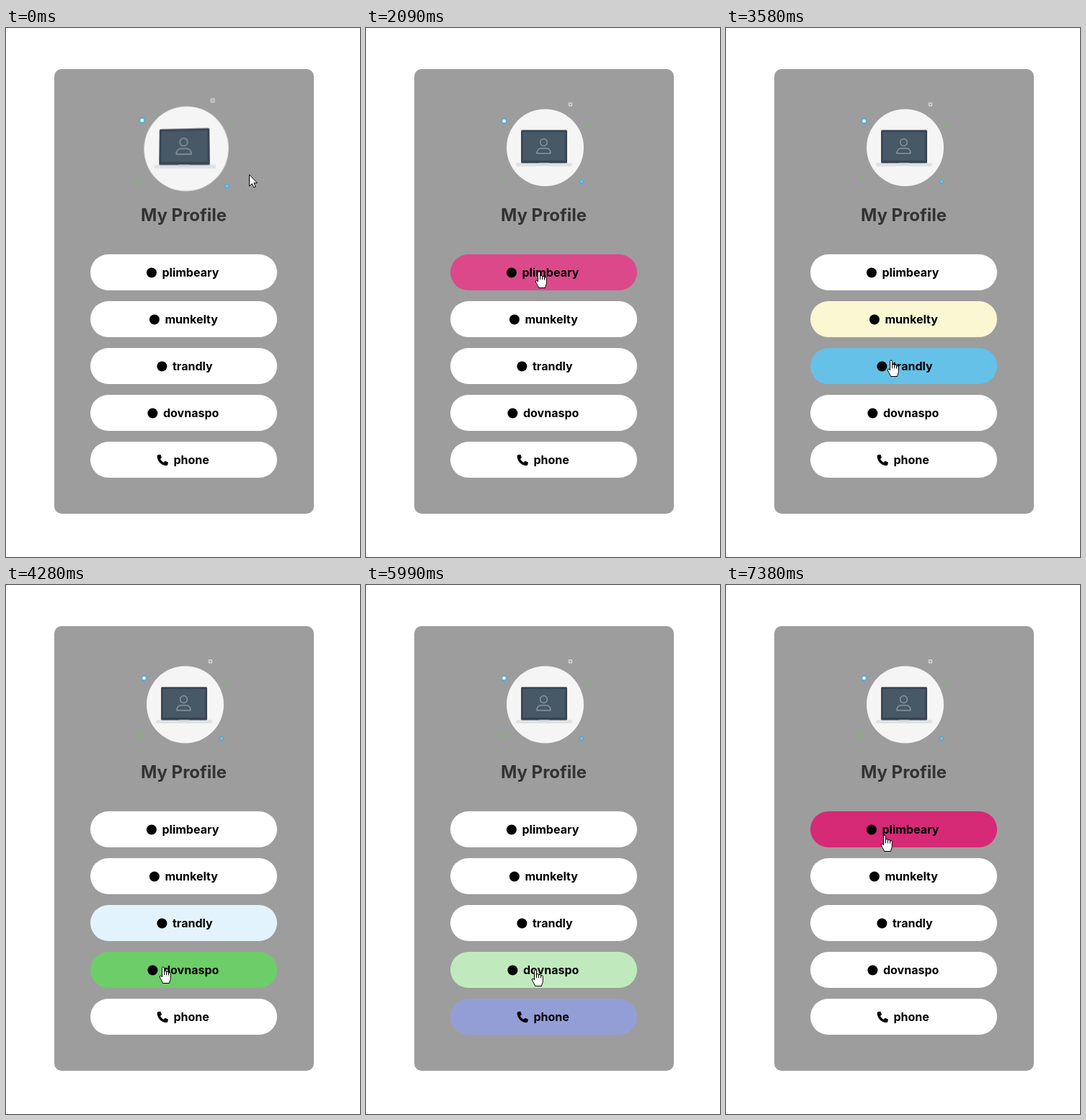
An HTML page for the animation above (7850 ms loop, 491 px wide and 734 px high).

```html
<!DOCTYPE html>
<html lang="en">
<head>
<meta charset="utf-8">
<title>My Profile</title>
<style>
  html, body { margin: 0; width: 100%; height: 100%; overflow: hidden; background: #fff; }
  svg { position: absolute; left: 0; top: 0; display: block; overflow: visible; }
  text { font-family: Inter, "Open Sans", sans-serif; font-weight: 700; }
  .title { font-size: 24px; fill: #333; }
  .label { font-size: 16px; }
  #tilt { position: absolute; left: 117px; top: 102px; width: 259px; height: 122px; }
  #cursor path { fill: #fff; stroke: #000; stroke-linejoin: round; }
</style>
</head>
<body>
<svg width="491" height="734">
  <rect x="67" y="57" width="360" height="617" rx="10" fill="#9d9d9d"/>
  <text class="title" x="246.5" y="268" text-anchor="middle">My Profile</text>
  <g id="list"></g>
  <path transform="translate(209.6 591.8) scale(.96)" d="M5.2.8A1.3 1.3 0 0 0 3.7 0L.9.8A1.3 1.3 0 0 0 0 2C0 9.7 6.3 16 14 16A1.3 1.3 0 0 0 15.1 15.1L15.9 12.3A1.3 1.3 0 0 0 15.2 10.8L12.2 9.6A1.3 1.3 0 0 0 10.8 10L9.5 11.5A10.5 10.5 0 0 1 4.5 6.5L6 5.2A1.3 1.3 0 0 0 6.4 3.8z"/>
</svg>

<div id="tilt">
  <svg width="259" height="122" viewBox="117 102 259 122">
    <circle cx="248.5" cy="166" r="53.5" fill="#f5f5f5"/>
    <rect x="208" y="187" width="78" height="5" rx="2" fill="#e1e2e3"/>
    <rect x="215" y="141.5" width="64" height="46" rx="1.5" fill="#394452"/>
    <rect x="217.5" y="144.3" width="59" height="39.7" fill="#475866"/>
    <rect x="239.5" y="187" width="15" height="2.2" fill="#c9cccf"/>
    <g fill="none" stroke="#8b959d" stroke-width="1.5">
      <circle cx="246.5" cy="158.7" r="4.9"/>
      <path d="M237 174c0-4.6 2.7-7 6-7h7c3.3 0 6 2.4 6 7z" stroke-linejoin="round"/>
    </g>
    <circle cx="191.5" cy="129.2" r="3.4" fill="#fff" stroke="#4fabd5" stroke-width="2"/>
    <circle cx="299" cy="213" r="2.2" fill="#8fc9e6" stroke="#4fabd5" stroke-width="1.5"/>
    <rect x="281.6" y="104.1" width="3.8" height="3.8" fill="none" stroke="#d5d5d5" stroke-width="1.5"/>
    <path d="M303.5 132l8.5 4.3-8 3.5zM188 203.5l4.5 7.5h-9z" fill="#8da983"/>
  </svg>
</div>

<svg width="491" height="734">
  <g id="cursor">
    <path id="arrow" d="M.5 .5V16.5L4.3 13 6.7 18.4 9.2 17.3 6.8 12H11.5z"/>
    <g id="hand">
      <path d="M-1.5 14.5V2a1.5 1.5 0 0 1 3 0V7.5a1.5 1.5 0 0 1 3 0v.8a1.5 1.5 0 0 1 3 .2v1a1.4 1.4 0 0 1 2.8 .2V16c0 3-1.5 4-1.8 7H-.5c-.3-2-2.8-5-4.2-8.5-.6-1.6 1.4-2.6 2.4-1.2z"/>
      <path d="M1.5 7.5v4.3M4.5 8.3v3.6M7.5 9.3v2.8"/>
    </g>
  </g>
</svg>

<script>
const LOOP = 7850, STEP = 77.77, FADE = 500;
const ORBIT = 1430, LEAVE = 1500, RESET = 300;
const TOP = 314, PITCH = 65, HEIGHT = 50;
const $ = id => document.getElementById(id);

const buttons = [
  { name: 'plimbeary', x: 216.5, colour: '#d62976' },
  { name: 'munkelty', x: 220.5, colour: '#e7d60e' },
  { name: 'trandly', x: 231, colour: '#26a7de' },
  { name: 'dovnaspo', x: 218, colour: '#4dc247' },
  { name: 'phone', x: 232.5, colour: '#3f51b5' }
];

// Where the pointer turns or rests: time, x, y
const stops = [
  [ORBIT, 337, 203], [1820, 245, 316], [2200, 238, 346], [2570, 238, 346],
  [2640, 234, 379], [3030, 232, 410], [3310, 235, 428], [3365, 234, 445],
  [3810, 224, 477], [3950, 224, 477], [4010, 221, 509], [4280, 218, 530],
  [4570, 226, 575], [5000, 237, 598], [5815, 237, 598], [5870, 237, 557],
  [5990, 235, 531], [6500, 235, 444], [6600, 236, 414], [6830, 234, 402],
  [6885, 228, 364], [7370, 220, 346]
];

function bezier(x1, y1, x2, y2) {
  const at = (a, b, s) => 3 * a * s * (1 - s) ** 2 + 3 * b * s * s * (1 - s) + s ** 3;
  return x => {
    if (x <= 0) return 0;
    if (x >= 1) return 1;
    let lo = 0, hi = 1;
    for (let i = 0; i < 24; i++) {
      const mid = (lo + hi) / 2;
      if (at(x1, x2, mid) < x) lo = mid; else hi = mid;
    }
    return at(y1, y2, lo);
  };
}
const ease = bezier(.25, .1, .25, 1);
const snap = bezier(.03, .98, .52, .99);

// One turn around the picture, then straight moves down and up the list
function cursorAt(t) {
  if (t < ORBIT) {
    const a = .45 + 2 * Math.PI * t / ORBIT;
    return [266 + 79 * Math.cos(a), 190 + 30 * Math.sin(a)];
  }
  const i = stops.findIndex(s => s[0] > t);
  if (i < 0) return stops[stops.length - 1].slice(1);
  const [t0, x0, y0] = stops[i - 1], [t1, x1, y1] = stops[i];
  const k = (t - t0) / (t1 - t0);
  return [x0 + (x1 - x0) * k, y0 + (y1 - y0) * k];
}

function buttonAt(t) {
  const y = cursorAt(t)[1] - TOP;
  return y >= 0 && y % PITCH <= HEIGHT ? buttons[Math.floor(y / PITCH)] : undefined;
}

// Follow the pointer once to learn when each button is hovered
function findHovers() {
  buttons.forEach(b => b.hovers = []);
  let current;
  for (let t = 0; t < LOOP; t += 2) {
    const next = buttonAt(t);
    if (next === current) continue;
    if (current) current.hovers[current.hovers.length - 1].leave = t;
    if (next) next.hovers.push({ enter: t, leave: Infinity });
    current = next;
  }
}

// A fade out from a partial fade in is shortened in proportion
function hoverAmount(hovers, t) {
  const last = hovers.filter(h => h.enter <= t).pop();
  if (!last) return 0;
  const full = ease((Math.min(t, last.leave) - last.enter) / FADE);
  return t < last.leave ? full : full * (1 - ease((t - last.leave) / (FADE * full)));
}

function add(tag, attrs, text = '') {
  const el = document.createElementNS('http://www.w3.org/2000/svg', tag);
  for (const key in attrs) el.setAttribute(key, attrs[key]);
  el.textContent = text;
  return $('list').appendChild(el);
}

function buildList() {
  buttons.forEach((b, i) => {
    const y = TOP + PITCH * i;
    b.bar = add('rect', { x: 117, y, width: 259, height: HEIGHT, rx: HEIGHT / 2 });
    if (b.name !== 'phone') add('circle', { cx: b.x - 14.6, cy: y + 25.5, r: 7 });
    add('text', { class: 'label', x: b.x, y: y + 31 }, b.name);
  });
}

function drawTilt(t) {
  const [x, y] = cursorAt(Math.min(t, LEAVE));
  const k = 1 - snap((t - LEAVE) / RESET);
  const rx = ((y - 102) / 122 * 20 - 10) * k;
  const ry = (10 - (x - 117) / 259 * 20) * k;
  const s = 1 + .1 * k;
  $('tilt').style.transform =
    `perspective(300px) rotateX(${rx}deg) rotateY(${ry}deg) scale3d(${s},${s},${s})`;
}

function draw(t) {
  drawTilt(t);
  for (const { bar, colour, hovers } of buttons) {
    bar.style.fill = `color-mix(in srgb, ${colour} ${hoverAmount(hovers, t) * 100}%, #fff)`;
  }
  const over = buttonAt(t);
  const [x, y] = cursorAt(t).map(Math.round);
  $('cursor').setAttribute('transform', `translate(${x} ${over ? y + .5 : y})`);
  $('arrow').style.display = over ? 'none' : '';
  $('hand').style.display = over ? '' : 'none';
}

// The picture advances in even steps
const hold = t => Math.max(0, 70 + Math.floor((t - 70) / STEP + .2) * STEP);

buildList();
findHovers();
const start = performance.now();
function tick() {
  draw(hold((performance.now() - start) % LOOP));
  requestAnimationFrame(tick);
}
tick();
</script>
</body>
</html>
```
